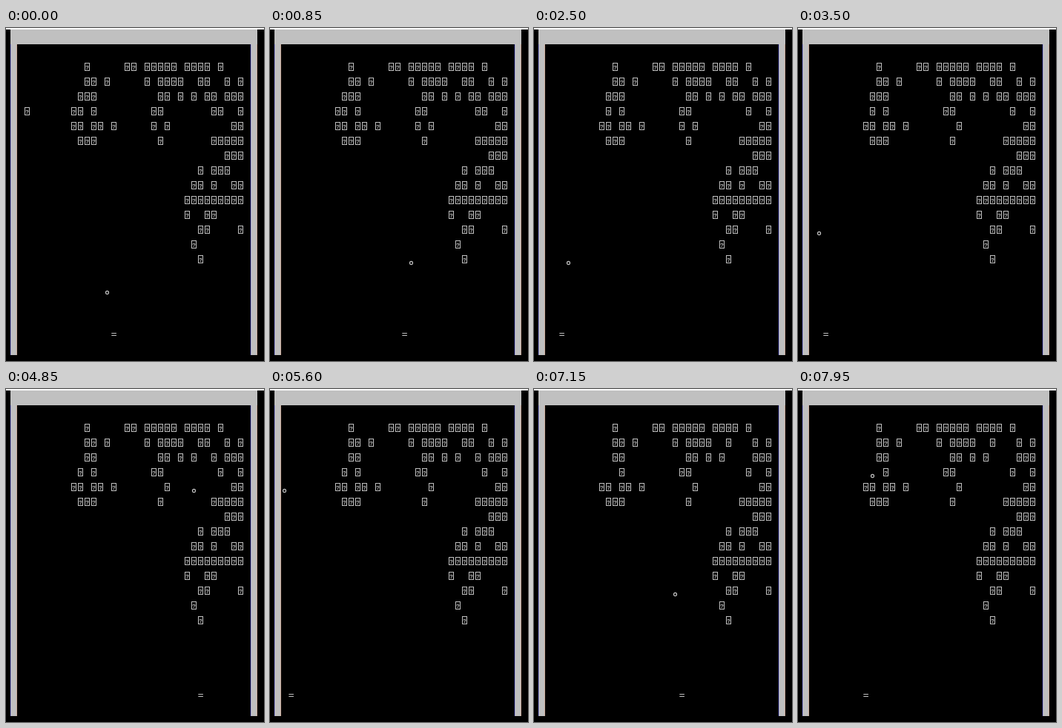
Write an HTML page with a canvas that moves like this. It is 348 px wide and 450 px high and loops after 8000 ms.

```html
<!DOCTYPE html>
<html lang="en">
<head>
<meta charset="utf-8">
<title>Brick game</title>
<style>
  html, body { margin: 0; width: 100%; height: 100%; overflow: hidden; background: #000; }
  canvas { display: block; }
</style>
</head>
<body>
<canvas id="stage" width="348" height="450"></canvas>
<script>
const ctx = document.getElementById('stage').getContext('2d');
const LOOP = 8000, FRAME = 50, LAST_TICK = 268;
const CELL_W = 9, CELL_H = 20, LEFT = 6, TOP = 2;
const WALL_COL = 36, PADDLE_ROW = 20;
const GRAY = '#c0c0c0';

// Brick columns per row, starting with row 2.
const BRICKS = [
  '11 17-18 20-24 26-29 31',
  '11-12 14 20 22-25 28-29 32 34',
  '10-12 22-23 25 27 29-30 32-34',
  '2 9-10 12 21-22 30-31 34',
  '9-10 12-13 15 21 23 33-34',
  '10-12 22 30-34',
  '32-34',
  '28 30-32',
  '27-28 30 33-34',
  '26-34',
  '26 29-30',
  '28-29 34',
  '27',
  '28'
];

// Game clock: [time in ms, ticks played]; equal times make a jump.
const PACE = [
  [0, 0.3], [1700, 56.2], [2500, 82.2], [3500, 116.5], [4850, 161.5],
  [6400, 214.5], [7600, 256.3], [7699, 256.3], [7699, 259.9], [7950, 268.6], [8000, 268.9]
];

const key = (col, row) => row * 100 + col;
const bricks = new Map();
BRICKS.forEach((line, i) => {
  for (const run of line.split(' ')) {
    const [from, to = from] = run.split('-').map(Number);
    for (let col = from; col <= to; col++) {
      bricks.set(key(col, i + 2), { col, row: i + 2, brokenAt: Infinity });
    }
  }
});

function playGame() {
  let x = 14, y = 17, dx = -1, dy = -1;
  const path = [{ x, y, paddle: 15 }];
  for (let tick = 1; tick <= LAST_TICK; tick++) {
    const hit = (col, row) => {
      if (col <= 0 || col >= WALL_COL || row <= 0 || row >= PADDLE_ROW) return true;
      const brick = bricks.get(key(col, row));
      if (!brick || brick.brokenAt < tick) return false;
      brick.brokenAt = tick;
      return true;
    };
    const side = hit(x + dx, y);
    const ahead = hit(x, y + dy);
    const corner = !side && !ahead && hit(x + dx, y + dy);
    if (side || corner) dx = -dx;
    if (ahead || corner) dy = -dy;
    const paddle = x;
    x += dx;
    y += dy;
    path.push({ x, y, paddle });
  }
  return path;
}
const path = playGame();

function tickAt(time) {
  const i = PACE.findIndex(([end]) => end > time);
  const [t0, n0] = PACE[i - 1], [t1, n1] = PACE[i];
  return Math.min(LAST_TICK, Math.floor(n0 + (n1 - n0) * (time - t0) / (t1 - t0)));
}

const cellX = col => LEFT + col * CELL_W;
const cellY = row => TOP + row * CELL_H;

function rect(color, x, y, w, h) {
  ctx.fillStyle = color;
  ctx.fillRect(x, y, w, h);
}

function drawWalls() {
  rect('#fff', 0, 0, 348, TOP);
  rect(GRAY, LEFT, TOP, 333, CELL_H);
  for (const x of [cellX(0), cellX(WALL_COL)]) {
    rect(GRAY, x, TOP, CELL_W, 440);
    // Coloured fringes of subpixel text smoothing.
    rect('#000030', x - 1, 22, 1, 420);
    rect('#a0a0c8', x, 22, 1, 420);
    rect('#c8a898', x + CELL_W - 1, 22, 1, 420);
  }
}

function drawBrick({ col, row }) {
  const x = cellX(col), y = cellY(row);
  ctx.strokeRect(x + 1.5, y + 5.5, 6, 10);
  ctx.fillText('?', x + 4.5, y + 14);
}

function drawBall(col, row) {
  ctx.lineWidth = 1.2;
  ctx.beginPath();
  ctx.ellipse(cellX(col) + 4.5, cellY(row) + 15.5, 2, 2.1, 0, 0, Math.PI * 2);
  ctx.stroke();
}

function drawPaddle(col) {
  for (const dy of [10, 13]) rect(GRAY, cellX(col) + 1.3, cellY(PADDLE_ROW) + dy, 6.6, 1);
}

function draw(time) {
  const tick = tickAt(time);
  const { x, y, paddle } = path[tick];
  rect('#000', 0, 0, 348, 450);
  drawWalls();

  ctx.fillStyle = ctx.strokeStyle = GRAY;
  ctx.lineWidth = 1;
  ctx.font = 'bold 8px "Liberation Sans", sans-serif';
  ctx.textAlign = 'center';
  for (const brick of bricks.values()) {
    if (brick.brokenAt > tick) drawBrick(brick);
  }
  drawBall(x, y);
  drawPaddle(paddle);
}

const start = performance.now();
function frame(now) {
  const time = Math.max(0, now - start) % LOOP;
  draw(Math.floor(time / FRAME) * FRAME);
  requestAnimationFrame(frame);
}
draw(0);
requestAnimationFrame(frame);
</script>
</body>
</html>
```
